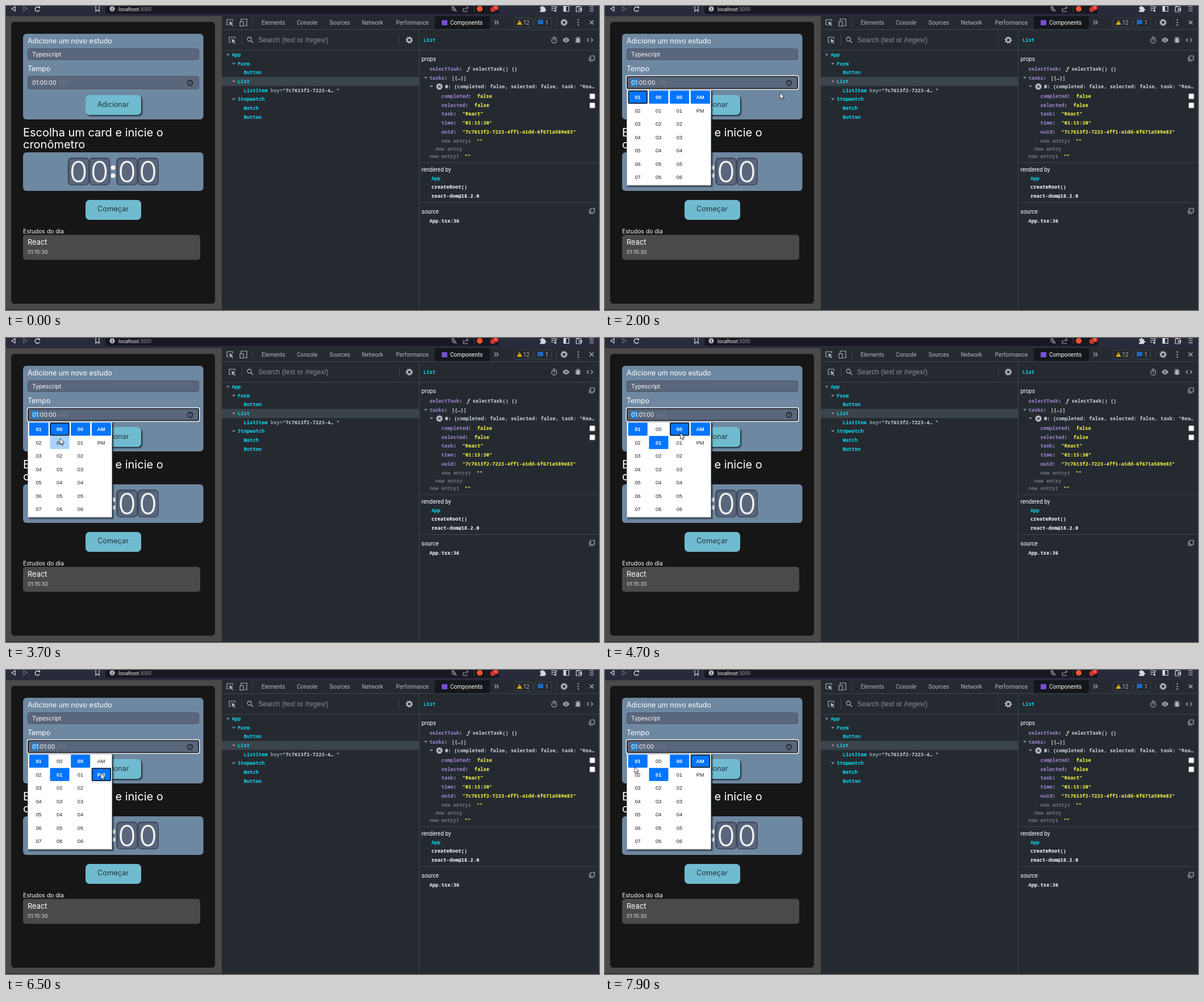
An HTML page that plays this animation: 1044x536 px, repeating every 8 s.

```html
<!DOCTYPE html>
<html lang="pt">
<head>
<meta charset="utf-8">
<title>Estudos</title>
<style>
html, body { margin: 0; width: 100%; height: 100%; overflow: hidden; background: #252a31 }
svg { display: block }
text { white-space: pre }
.ui { font-family: Inter, sans-serif }
.dev { font-family: Roboto, sans-serif }
.pick { font-family: "Liberation Sans", Arial, sans-serif }
.mono { font-family: "Noto Sans Mono", monospace; font-weight: 600 }
</style>
</head>
<body>
<svg width="1044" height="536" viewBox="0 0 1044 536">
<defs>
<filter id="shade" x="-20%" y="-20%" width="140%" height="150%">
<feDropShadow dx="2" dy="2" stdDeviation="1.2" flood-color="#10141c" flood-opacity=".85"/>
</filter>
</defs>
<g id="page"></g>
<g id="live"></g>
<path id="cursor" d="M0 0V10.6L2.5 8.4L4.2 12.2L6 11.4L4.4 7.7H7.8Z" fill="#fff" stroke="#111" stroke-width=".8"/>
</svg>
<script>
const rect = (x, y, w, h, fill, r = 0, more = '') =>
  `<rect x="${x}" y="${y}" width="${w}" height="${h}" rx="${r}" fill="${fill}" ${more}/>`;
const text = (x, y, s, size, fill, cls = 'ui', more = '') =>
  `<text x="${x}" y="${y}" font-size="${size}" fill="${fill}" class="${cls}" ${more}>${s}</text>`;
const mono = (x, y, s, fill) => text(x, y + 3, s, 8.77, fill, 'mono');
const dot = (x, y, r, fill, more = '') => `<circle cx="${x}" cy="${y}" r="${r}" fill="${fill}" ${more}/>`;
const shape = (d, fill) => `<path d="${d}" fill="${fill}"/>`;
const line = (d, color = '#aeb3b9', w = 1.2) =>
  `<path d="${d}" fill="none" stroke="${color}" stroke-width="${w}"/>`;
const mid = 'text-anchor="middle"';

const gear = (x, y, r) =>
  dot(x, y, r * .62, 'none', `stroke="#aeb3b9" stroke-width="${r * .45}"`) +
  dot(x, y, r * .9, 'none', `stroke="#aeb3b9" stroke-width="${r * .3}" stroke-dasharray="${r * .35}"`);
const picker = (x, y) =>
  line(`M${x + 3} ${y + 9}H${x}V${y}H${x + 10}V${y + 3}`) +
  shape(`M${x + 4} ${y + 3}l7 3l-3 1.2l3 3.2l-1.2 1.2l-3.2 -3.2l-1 2.8Z`, '#aeb3b9');
const copyIcon = y => line(`M1029 ${y}h7v7h-7z`) + line(`M1027 ${y + 2}v7h7`, '#aeb3b9', 1);
const fold = (x, y) => shape(`M${x - 3} ${y - 1.5}h6l-3 3.6z`, '#878d94');

function browserBar() {
  const white = '#d6d8de', gray = '#a9abb5';
  return rect(0, 0, 1044, 18, '#292b3a') + rect(175, -10, 693, 24, '#171822', 4) +
    line('M16 1L10 5L16 9Z', white) + line('M31 1L37 5L31 9Z', '#6c6e7a') +
    line('M58.5 3A4 4 0 1 0 59 7', white, 1.5) + shape('M56 1h4v4z', white) +
    line('M158 0V9.5L161 7L164 9.5V0', white) +
    dot(187, 5, 4.5, '#b9bbc4') + rect(186.4, 4, 1.2, 4, '#171822') + rect(186.4, 2, 1.2, 1.2, '#171822') +
    text(198, 9, 'localhost<tspan fill="#9698a3">:3000</tspan>', 8.8, '#f1f1f4', 'dev') +
    line('M784 2h6M787 0v2M789 2q-1 4 -5 5M785 3q2 3 4 4M788 10L790.5 4L793 10M789 8h3', gray, 1) +
    line('M806 4H805V10H812V8M807 7Q808 3 813 3M811 0.5L814 3L811 5.5', gray, 1) +
    rect(824, 0, 1, 12, '#41434f') + dot(834, 5, 5, '#fb542b') + dot(857, 6, 4.5, '#c8372d') +
    rect(858, -2, 9, 9, '#e8372c', 3) + text(862.5, 5.3, '1', 7, '#fff', 'dev', mid) +
    shape('M940 2h3a1.6 1.6 0 1 1 3 0h3v3a1.6 1.6 0 1 1 0 3v2.5h-9v-3a1.5 1.5 0 1 0 0 -2.8z', white) +
    line('M960 1.5h8M960 4.5h8M960 7.5h4M968 8V2h2.5', white) + dot(967, 8.5, 1.7, white) +
    line('M982 .5h9v9h-9z', white) + rect(982, 0, 4, 10, white) +
    line('M1004 1.5h8.5v8.5h-8.5zM1004 1.5l6 -2M1009 4.5h4.5v3h-4.5z', white) +
    line('M1027.5 1.5h7M1027.5 5h7M1027.5 8.5h7', white);
}

function app() {
  const blue = '#6e88a1', field = '#5a667b', aqua = '#70bbcf', ink = '#26343d';
  const edge = 'stroke="#4a5262"';
  let s = rect(0, 18, 380, 518, '#494949') + rect(9, 28, 359, 497, '#161616', 6) +
    rect(30, 49, 317.5, 151, blue, 6) +
    text(38, 66, 'Adicione um novo estudo', 12.4, '#fff') +
    rect(38.5, 75.5, 301, 19, field, 3, edge) + text(46, 88.5, 'Typescript', 10.2, '#fff') +
    text(38, 114.5, 'Tempo', 12.4, '#fff') + rect(38.5, 124, 301, 22, field, 3, edge) +
    rect(140, 157, 98, 35, aqua, 7, 'filter="url(#shade)"') +
    text(188.5, 177.5, 'Adicionar', 12.4, ink, 'ui', mid) +
    text(30, 229.5, 'Escolha um card e inicie o', 20, '#fff') + text(30, 250.5, 'cronômetro', 20, '#fff') +
    rect(30, 258, 317.5, 68, blue, 6);
  for (const x of [127.5, 164.5, 213, 250])
    s += rect(x - 18, 268, 36, 47.5, field, 6, 'stroke="#3c4659" stroke-width="1.6"') +
      line(`M${x - 16.5} 313V274Q${x - 16.5} 269.5 ${x - 12} 269.5H${x + 15}`, '#465167', 1.5) +
      text(x, 311, '0', 52, '#f4f4f4', 'ui', mid + ' font-weight="300"');
  return s + dot(188.5, 285, 4, '#f4f4f4') + dot(188.5, 299, 4, '#f4f4f4') +
    rect(140, 342, 98, 35, aqua, 7) + text(188.5, 362, 'Começar', 12.8, ink, 'ui', mid) +
    text(30, 400.5, 'Estudos do dia', 10.3, '#fff') + rect(30, 403.5, 312, 44, '#4a4a4a', 5) +
    text(38, 420.5, 'React', 12.9, '#fff') + text(38, 437, '01:15:30', 9.3, '#dedede');
}

function devtools() {
  const cyan = '#10d8ec', gray = '#aeb3b9', edge = '#40464d', white = '#f4f5f6';
  const purple = '#9d87d2', yellow = '#f4f44a', dim = '#6c7279', pale = '#c8d0d8';
  let s = rect(380, 18, 664, 518, '#252a31') +
    rect(755, 18, 97, 23, '#14171b') + rect(380, 41, 664, 1, edge) + rect(380, 77.5, 664, 1, edge) +
    rect(727, 42, 1, 494, edge) + rect(728, 275.5, 316, 1, edge) + rect(728, 346, 316, 1, edge);

  // Tab strip
  s += picker(389, 24) + line('M414 28V23H424V35H420M412 27.5h6v8h-6z') + rect(434, 22, 1, 15, edge);
  const tabs = { Elements: 450, Console: 512, Sources: 569.5, Network: 626.5, Performance: 686.5 };
  for (const name in tabs) s += text(tabs[name], 33, name, 10, '#b4b9be', 'dev');
  s += rect(767, 25, 10, 9, '#7850d8', 1) + text(782, 33, 'Components', 10, '#fff', 'dev') +
    line('M860 25.5l3 3.5l-3 3.5M864 25.5l3 3.5l-3 3.5') +
    rect(894.5, 21, 33, 16.5, 'none', 2, `stroke="${edge}"`) + shape('M904 24.5l4.5 8.5h-9z', '#f3b400') +
    rect(903.5, 27, 1, 3, '#252a31') + text(910.5, 33, '12', 10, gray, 'dev') +
    rect(930.5, 21, 30, 16.5, 'none', 2, `stroke="${edge}"`) +
    shape('M936.5 24.5h9v7h-6.5l-2.5 2.5z', '#1a7de8') + line('M938 27h6M938 29.2h4', '#252a31', .8) +
    text(949.5, 33, '1', 10, gray, 'dev') + rect(969, 22, 1, 15, edge) + gear(982.5, 29, 6) +
    [24.5, 29, 33.5].map(y => dot(1007.5, y, 1.2, gray)).join('') +
    line('M1027.5 25.5l7 7M1034.5 25.5l-7 7', gray, 1.4);

  // Component tree
  s += picker(393, 55) + rect(415, 51, 1, 18, edge) +
    dot(428.5, 58.5, 3.5, 'none', `stroke="${gray}" stroke-width="1.3"`) + line('M431 61l4 4', gray, 1.5) +
    text(444, 64, 'Search (text or /regex/)', 12.1, '#8a9097', 'pick') +
    rect(692, 51, 1, 18, edge) + gear(710, 60, 6) + rect(380, 125, 347, 16, '#3b434b');
  const tree = [['App', 0], ['Form', 1], ['Button', 2], ['List', 1], ['ListItem', 2], ['Stopwatch', 1], ['Watch', 2], ['Button', 2]];
  tree.forEach(([name, depth], i) => {
    const x = 397.5 + depth * 10.5, y = 86 + i * 15.65;
    if (depth < 2) s += fold(x - 7, y);
    s += mono(x, y, name, cyan);
  });
  s += mono(466, 148.6, '<tspan fill="#8f9aa6">key=</tspan>"7c7613f2-7223-4… "', pale);

  // Inspector
  s += mono(735, 60, 'List', cyan) +
    dot(965, 61, 4.3, 'none', `stroke="${gray}" stroke-width="1.2"`) + line('M963 54.5h4M965 61v-3M968.5 57l1 -1') +
    shape('M980 60q6 -8.5 12 0q-6 8.5 -12 0z', gray) + dot(986, 60, 2.5, '#252a31') + dot(986, 60, 1.4, gray) +
    rect(1004, 56, 6, 9, gray, 3) + line('M1002 57.5h10M1002 60.5h10M1002 63.5h10M1004.5 54l1.5 2M1009.5 54l-1.5 2') +
    line('M1026 57l-3 3l3 3M1030 57l3 3l-3 3', gray, 1.3) + copyIcon(88) + copyIcon(357);
  for (const [y, name] of [[97, 'props'], [292, 'rendered by'], [365.5, 'source']])
    s += text(731.5, y, name, 10, '#fff', 'dev');
  const entry = (x, y, key, value, vx, color = yellow, keyColor = purple) =>
    mono(x, y, `${key}<tspan fill="${white}">:</tspan>`, keyColor) + mono(vx, y, value, color);
  s += entry(745.5, 111, 'selectTask', '<tspan font-style="italic">ƒ</tspan> selectTask() {}', 811, pale) +
    fold(739, 126.5) + entry(745.5, 127, 'tasks', '[{…}]', 784.5, pale) +
    fold(749, 141.5) + dot(763, 142, 5.5, '#b9bec3') +
    line('M760.8 139.8l4.4 4.4M765.2 139.8l-4.4 4.4', '#252a31') +
    mono(773, 142, `0: <tspan fill="${pale}">{completed: false, selected: false, task: "Rea…</tspan>`, white) +
    entry(766.5, 159, 'completed', 'false', 829.5) + entry(766.5, 175, 'selected', 'false', 824.5) +
    entry(766.5, 190, 'task', '"React"', 803.5) + entry(766.5, 206, 'time', '"01:15:30"', 803.5) +
    entry(766.5, 222, 'uuid', '"7c7613f2-7223-4ff1-a1dd-6f671a589e83"', 803.5) +
    entry(766.5, 237.5, 'new entry', '""', 828.5, yellow, dim) + mono(756, 251.5, 'new entry', dim) +
    entry(745.5, 264.5, 'new entry', '""', 807.5, yellow, dim);
  for (const y of [154.5, 170.5]) s += rect(1027.5, y, 9.5, 9.5, '#fff', 1.5, 'stroke="#777"');
  return s + mono(749, 303.5, 'App', cyan) + mono(749, 319, 'createRoot()', white) +
    mono(749, 335, 'react-dom@18.2.0', white) + mono(745.5, 379, 'App.tsx:36', white);
}

// Pointer stops: time, x, y
const stops = [
  [200, 10, -14], [300, 17, -8], [900, 120, 82], [1000, 140, 112], [1100, 140, 112], [1400, 235, 142], [1700, 320, 133],
  [1800, 320, 133], [1900, 319, 137], [2000, 308, 153], [2200, 245, 178], [2300, 245, 178], [2800, 78, 172],
  [2900, 78, 172], [3300, 92, 162], [3700, 95, 177], [3900, 96, 178], [4000, 127, 180], [4100, 127, 180],
  [4400, 132, 167], [5500, 134, 169], [5600, 135, 172], [5800, 135, 172], [6200, 166, 182], [6500, 167, 182],
  [7200, 170, 164], [7300, 170, 164], [7400, 160, 169], [7500, 118, 172], [7600, 118, 172], [7900, 52, 171]
];
function pointer(t) {
  const i = stops.findIndex(s => s[0] >= t);
  if (i < 1) return stops[i < 0 ? stops.length - 1 : 0].slice(1);
  const [a, b] = [stops[i - 1], stops[i]], k = (t - a[0]) / (b[0] - a[0]);
  return [1, 2].map(n => a[n] + (b[n] - a[n]) * k);
}

// Clicks in the open list: time, column, row
const clicks = [[3300, 1, 0], [3900, 1, 1], [4600, 2, 0], [6500, 3, 1], [7300, 3, 0]];

function live(t, [px, py]) {
  const open = t >= 1900, picked = [0, 0, 0, 0];
  let focus = 0;
  for (const [at, col, row] of clicks) if (t >= at) { picked[col] = row; focus = col; }
  let s = '';
  if (open) s += rect(37.5, 123, 303, 24, '#5a667b', 3, 'stroke="#fff" stroke-width="1.5"') +
    rect(39, 124.5, 300, 21, 'none', 2, 'stroke="#15181d" stroke-width="1.6"') + rect(46, 128.5, 11, 13, '#1c83dc');
  s += text(46, 138.5, `01:0${picked[1]}:00`, 10.3, '#fff') +
    text(picked[1] ? 91 : 93, 138.5, picked[3] ? 'PM' : 'AM', 9.8, '#737b88') +
    dot(324, 135.5, 4.5, 'none', 'stroke="#111" stroke-width="1.3"') + line('M324 132.5v3l2 1.5', '#111', 1);
  if (!open) return s;

  s += rect(38.5, 148, 148, 168, '#fff', 0, 'stroke="#a4a8ad" filter="url(#shade)"');
  for (let col = 0; col < 4; col++) for (let row = 0; row < (col < 3 ? 7 : 2); row++) {
    const x = 40.8 + col * 36.7, y = 149.3 + row * 23.5, on = picked[col] === row;
    const hover = px >= x && px < x + 34 && py >= y && py < y + 23;
    const label = col === 3 ? ['AM', 'PM'][row] : '0' + (row + (col === 0));
    if (on || hover) s += rect(x, y, 34, 23, on ? '#0075ff' : '#a9d3ff', 1);
    if (on && col === focus) s += rect(x + .7, y + .7, 32.6, 21.6, 'none', 1, 'stroke="#101010" stroke-width="1.5"');
    s += text(x + 16.7, y + 14.8, label, 9.2, on ? '#fff' : '#222', 'pick', mid + (on ? ' font-weight="700"' : ''));
  }
  return s;
}

const $ = id => document.getElementById(id);
$('page').innerHTML = browserBar() + app() + devtools() + rect(0, 535, 1044, 1, '#282229');
const start = performance.now();
let last = -1;
function draw() {
  const t = Math.floor((performance.now() - start) % 8000 / 100) * 100;
  if (t !== last) {
    const at = pointer(t);
    $('live').innerHTML = live(t, at);
    $('cursor').setAttribute('transform', `translate(${at})`);
    last = t;
  }
  requestAnimationFrame(draw);
}
draw();
</script>
</body>
</html>
```
